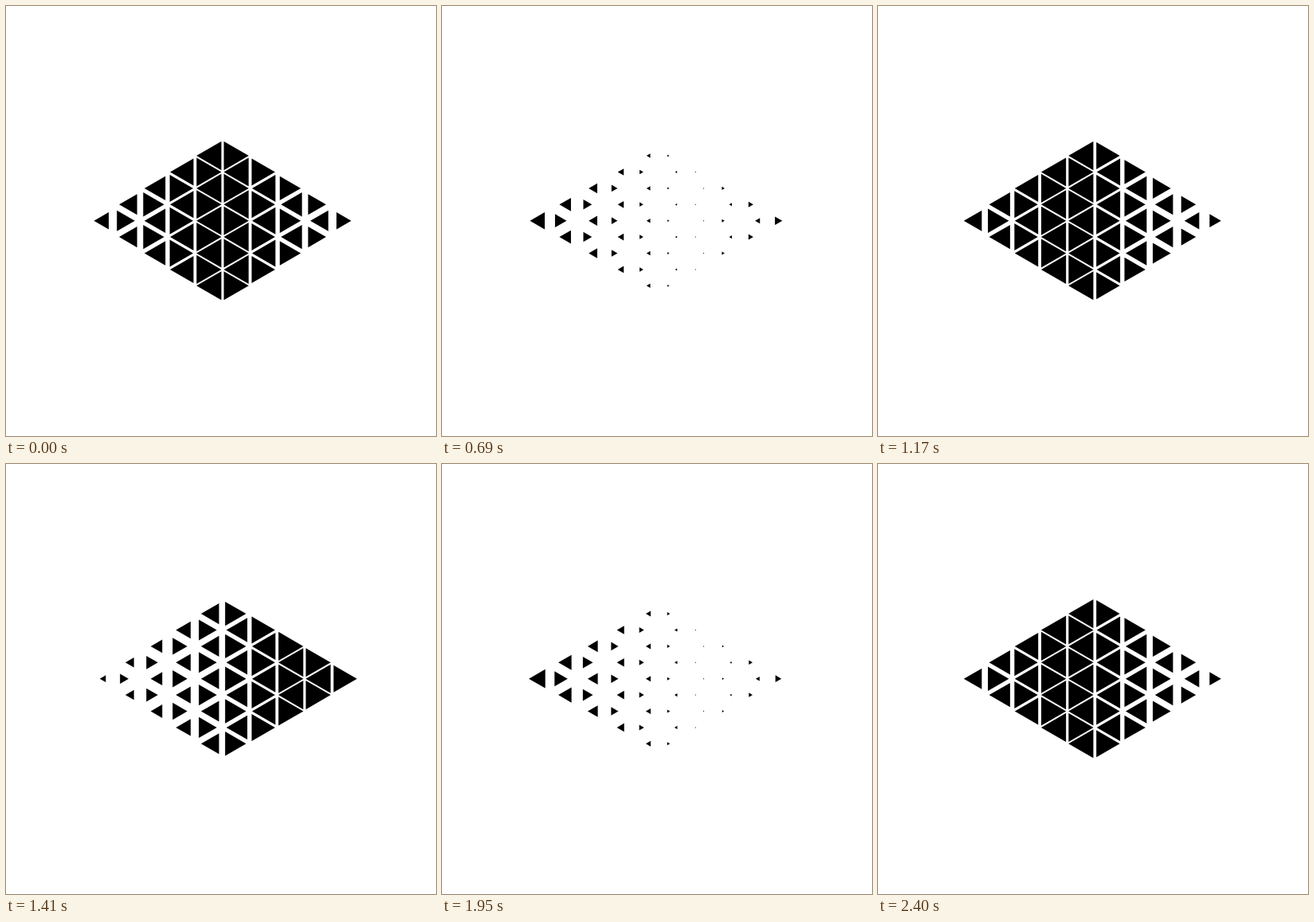
An HTML page with a canvas that plays this animation: 540x540 px, repeating every 2460 ms.

```html
<!DOCTYPE html>
<html lang="en">
<head>
<meta charset="utf-8">
<title>Triangle wave</title>
<style>
  html, body { margin: 0; width: 100%; height: 100%; overflow: hidden; background: #fff; }
  canvas { display: block; }
</style>
</head>
<body>
<canvas id="stage" width="540" height="540"></canvas>
<script>
  const ctx = document.getElementById('stage').getContext('2d');
  const LOOP = 2460, STEP = 30, LAST = 2400;
  const PERIOD = 1230, HALF = PERIOD / 2, DELAY = 60, FIRST_MIN = 345;
  const CX = 272, CY = 269.7, COL = 34.3, ROW = 20.4, OFFSET = 12;
  const COLS = 9, MID = 4;

  // Steady growth from the smallest size, settling softly at the largest.
  const grow = v => v * (0.684 + v * (0.2 + v * (1.546 - 1.43 * v)));

  // Triangle height for a vertical strip; the wave runs left to right.
  function heightAt(strip, t) {
    const phase = (t - FIRST_MIN - strip * DELAY + 2 * PERIOD) % PERIOD;
    return 0.8 + 30.7 * grow(1 - Math.abs(phase / HALF - 1));
  }

  // Equilateral triangle around its centroid; dir is -1 for left, 1 for right.
  function triangle(x, y, h, dir) {
    const base = x - dir * h / 3, half = h / Math.sqrt(3);
    ctx.beginPath();
    ctx.moveTo(base, y - half);
    ctx.lineTo(base + dir * h, y);
    ctx.lineTo(base, y + half);
    ctx.fill();
  }

  function draw(t) {
    ctx.fillStyle = '#fff';
    ctx.fillRect(0, 0, 540, 540);
    ctx.fillStyle = '#000';
    for (let col = 0; col < COLS; col++) {
      const x = CX + (col - MID) * COL;
      const reach = MID - Math.abs(col - MID);
      const left = heightAt(col, t), right = heightAt(col + 1, t);
      for (let row = -reach; row <= reach; row += 2) {
        const y = CY + row * ROW;
        triangle(x - OFFSET, y, left, -1);
        triangle(x + OFFSET, y, right, 1);
      }
    }
  }

  const start = performance.now();
  function tick() {
    const t = (performance.now() - start) % LOOP;
    draw(Math.min(LAST, Math.floor(t / STEP) * STEP));
    requestAnimationFrame(tick);
  }
  tick();
</script>
</body>
</html>
```
